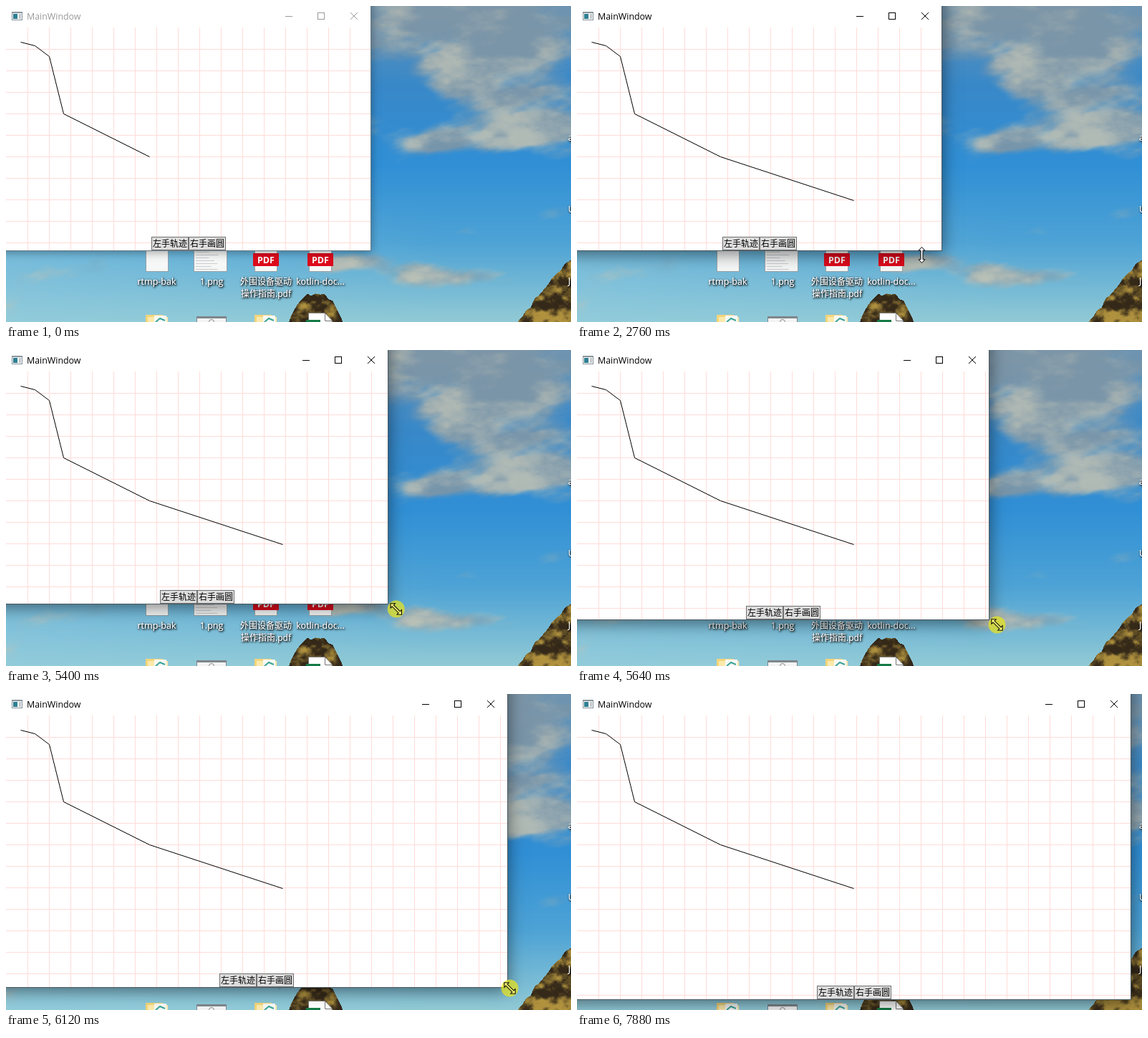
Animation, 789 px wide and 441 px high, one loop 8000 ms. Source, as an HTML page with a canvas:

```html
<!DOCTYPE html>
<html lang="zh">
<head>
<meta charset="utf-8">
<style>
html, body { margin: 0; width: 100%; height: 100%; overflow: hidden; }
canvas { display: block; }
</style>
</head>
<body>
<canvas id="stage" width="789" height="441"></canvas>
<script>
const W = 789, H = 441, LOOP = 8000;
const ctx = document.getElementById('stage').getContext('2d');
const FONT = '"Open Sans", "Noto Sans CJK SC", "Noto Sans CJK", sans-serif';

const lerp = (a, b, k) => a + (b - a) * k;
const mix = (a, b, k) => a.map((v, i) => lerp(v, b[i], k));
const clamp = v => Math.min(1, Math.max(0, v));
const smooth = v => (v = clamp(v)) * v * (3 - 2 * v);

function rect(c, color, x, y, w, h) {
  c.fillStyle = color;
  c.fillRect(x, y, w, h);
}

function trace(c, pts) {
  c.beginPath();
  pts.forEach(([x, y]) => c.lineTo(x, y));
}

function text(c, str, x, y, size, color, align = 'center', weight = '') {
  c.font = `${weight} ${size}px ${FONT}`;
  c.textAlign = align;
  c.fillStyle = color;
  c.fillText(str, x, y);
}

// ---------- scenery: fractal noise for clouds and rock ----------

function hash(x, y) {
  const v = Math.sin(x * 127.1 + y * 311.7) * 43758.5453;
  return v - Math.floor(v);
}

function noise(x, y) {
  const i = Math.floor(x), j = Math.floor(y), u = smooth(x - i), v = smooth(y - j);
  return lerp(lerp(hash(i, j), hash(i + 1, j), u), lerp(hash(i, j + 1), hash(i + 1, j + 1), u), v);
}

function fbm(x, y) {
  let sum = 0;
  for (let k = 0; k < 5; k++) sum += noise(x * 2 ** k + k * 17, y * 2 ** k) / 2 ** (k + 1);
  return sum;
}

const sky = [[98, 146, 183], [56, 136, 200], [48, 143, 213], [78, 163, 213], [146, 202, 213]];
const haze = [146, 205, 224], shade = [128, 150, 165], light = [194, 193, 178];
const umber = [52, 40, 24], ochre = [176, 146, 62];

// centre, radii, strength (negative opens a gap)
const clouds = [
  [640, 40, 230, 80, 1], [725, 130, 110, 45, 0.7], [725, 185, 110, 28, 0.9],
  [588, 190, 45, 15, 0.7], [575, 135, 45, 24, -0.9], [620, 318, 100, 14, 0.4],
  [578, 376, 48, 22, 0.8], [680, 378, 60, 24, 0.75], [470, 356, 80, 18, 0.7]
];

function scenery(x, y) {
  const ridge = 355 + 80 * ((W - x) / 70) ** 1.2;
  const dome = 402 + 39 * Math.abs((x - 433) / 38) ** 2.5;
  if (y > Math.min(ridge, dome) + 6 * noise(x / 6, 3) - 3)
    return mix(umber, ochre, smooth(fbm(x / 13, y / 11) * 2.4 - 0.75));

  const band = Math.min(3.99, y / H * 4), i = Math.floor(band);
  let color = mix(sky[i], sky[i + 1], band - i);
  color = mix(color, haze, 0.5 * clamp((y - 260) / 80) * clamp(1 - x / 600));

  let cover = (fbm((x + y * 0.6) / 85, (y + x * 0.12) / 38) - 0.48) * 1.5;
  for (const [cx, cy, rx, ry, s] of clouds)
    cover += s * Math.exp(-(((x - cx) / rx) ** 2) - ((y - cy) / ry) ** 2);
  const lit = smooth(fbm(x / 60 + 40, y / 30) * 2.2 - 0.9 + x / 2400 + y / 900 - 0.15);
  return mix(color, mix(shade, light, lit), 0.88 * smooth((cover - 0.3) / 0.65));
}

// ---------- desktop, painted once ----------

function label(c, str, x, y, size = 12.5, align) {
  c.save();
  c.shadowColor = '#000';
  c.shadowBlur = 3;
  c.shadowOffsetX = c.shadowOffsetY = 1;
  text(c, str, x, y, size, '#fff', align);
  text(c, str, x, y, size, '#fff', align);
  c.restore();
}

function page(c, x, w) {
  rect(c, '#96a1a6', x, 320, w, 51);
  rect(c, '#f6f7f7', x + 1, 320, w - 2, 50);
}

function pdf(c, x) {
  page(c, x - 16, 32);
  rect(c, '#dd0a1c', x - 18, 345, 36, 18);
  text(c, 'PDF', x, 358.5, 12.5, '#fff', 'center', 'bold');
}

function folder(c, x) {
  rect(c, '#f3d479', x, 431, 24, 10);
  rect(c, '#fbe9ac', x + 3, 434, 28, 7);
  rect(c, '#f8f8f4', x + 12, 432, 17, 9);
  c.strokeStyle = '#3aa59b';
  c.lineWidth = 2;
  trace(c, [[x + 14, 441], [x + 20, 436], [x + 27, 439]]);
  c.stroke();
}

function paintDesktop() {
  const canvas = document.createElement('canvas');
  canvas.width = W;
  canvas.height = H;
  const c = canvas.getContext('2d');
  const img = c.createImageData(W, H);
  for (let y = 0; y < H; y++)
    for (let x = 0; x < W; x++)
      if (x > 500 || y > 335) img.data.set([...scenery(x, y), 255], (y * W + x) * 4);
  c.putImageData(img, 0, 0);

  page(c, 195, 32);
  page(c, 262, 47);
  for (let y = 343; y < 368; y += 4) rect(c, '#c9ccce', 265, y, 12 + hash(y, 1) * 22, 1);
  pdf(c, 363);
  pdf(c, 439);
  label(c, 'rtmp-bak', 210.5, 389);
  label(c, '1.png', 287, 389);
  label(c, '外围设备驱动', 363, 389, 12);
  label(c, '操作指南.pdf', 363, 406, 12);
  label(c, 'kotlin-doc...', 439, 389);
  ['a', 'U', 'J'].forEach((s, i) => label(c, s, 785, 188 + i * 100, 12.5, 'left'));

  folder(c, 195);
  folder(c, 347);
  rect(c, '#7e868b', 266, 433, 42, 8);
  rect(c, '#f4f4f4', 267, 436, 40, 5);
  c.strokeStyle = '#888';
  c.lineWidth = 1;
  c.beginPath();
  c.arc(287, 441, 3.5, 0, 7);
  c.stroke();

  c.fillStyle = '#fff';
  c.strokeStyle = '#777';
  trace(c, [[422.5, 442], [422.5, 428.5], [445.5, 428.5], [455.5, 439], [455.5, 442]]);
  c.fill();
  c.stroke();
  trace(c, [[445.5, 428.5], [445.5, 439.5], [455.5, 439.5]]);
  c.stroke();
  rect(c, '#167a45', 419, 438, 20, 3);
  return canvas;
}

const desktop = paintDesktop();

// ---------- motion ----------

// time, x, y
const pointer = [
  [680, 521, 390], [1240, 280, 316], [1440, 236, 340], [1760, 225, 335],
  [2600, 225, 335], [2760, 481.5, 347.5], [3240, 500, 347.5], [3760, 513, 343],
  [4800, 509.5, 342.5], [5200, 510, 343], [5640, 586.5, 383.5], [5960, 698, 412],
  [6120, 703.5, 410.5], [6640, 773, 429], [7440, 776, 430], [7600, 774, 428]
];

function pointerAt(t) {
  const i = pointer.findIndex(p => p[0] > t);
  if (i < 1) return pointer.at(i).slice(1);
  const a = pointer[i - 1], b = pointer[i];
  return mix(a, b, (t - a[0]) / (b[0] - a[0])).slice(1);
}

// the dragged corner trails the pointer
function cornerAt(t) {
  const [x, y] = pointerAt(Math.max(5200, t - 60));
  return [Math.round(x - 1), Math.round(y - 2)];
}

// ---------- window ----------

const curve = [[20, 50], [40, 55], [60, 70], [80, 150], [200, 210], [386, 271]];

function button(str, x, y, hot, down) {
  rect(ctx, hot ? (down ? '#2c628b' : '#3c7fb1') : '#707070', x, y, 52, 19);
  rect(ctx, hot ? (down ? '#c4e5f6' : '#bee6fd') : '#dddddd', x + 1, y + 1, 50, 17);
  text(ctx, str, x + 26, y + 14, 12, '#000');
}

function drawWindow(w, h, t, mx, my) {
  const active = t >= 2000;
  const ink = active ? '#000' : '#999';
  ctx.save();
  ctx.shadowColor = active ? 'rgba(0,0,0,.5)' : 'rgba(0,0,0,.35)';
  ctx.shadowBlur = active ? 22 : 12;
  ctx.shadowOffsetY = active ? 4 : 2;
  rect(ctx, active ? '#4d5a62' : '#6a7c86', -40, -40, w + 41, h + 41);
  ctx.restore();
  rect(ctx, '#fff', 0, 0, w, h);

  for (let x = 30; x < w; x += 30) rect(ctx, '#ffdcd8', x, 30, 1, h - 30);
  for (let y = 60; y < h; y += 30) rect(ctx, '#ffdcd8', 0, y, w, 1);

  rect(ctx, '#8b959b', 8, 8, 15, 12);
  rect(ctx, '#f2f5f6', 9, 10, 13, 9);
  rect(ctx, '#2f7f93', 10, 11, 6, 7);
  rect(ctx, '#c3cacd', 18, 11, 3, 7);
  text(ctx, 'MainWindow', 29, 19, 12.4, ink, 'left');

  ctx.strokeStyle = ink;
  ctx.lineWidth = 1;
  rect(ctx, ink, w - 119, 14, 10, 1);
  ctx.strokeRect(w - 73.5, 9.5, 9, 9);
  ctx.beginPath();
  for (const s of [-5, 5]) {
    ctx.moveTo(w - 23 - s, 9);
    ctx.lineTo(w - 23 + s, 19);
  }
  ctx.stroke();

  ctx.strokeStyle = '#000';
  trace(ctx, curve.slice(0, t < 2160 ? 5 : 6).map(([x, y]) => [x + 0.5, y + 0.5]));
  ctx.stroke();

  const left = Math.round(w / 2 - 52), top = h - 19;
  const over = x => t >= 680 && t < 2600 && my >= top && my < h && mx >= x && mx < x + 52;
  const down = t >= 2000 && t < 2160;
  button('左手轨迹', left, top, over(left), down);
  button('右手画圆', left + 52, top, over(left + 52), down);
}

// ---------- pointer ----------

const arrow = [[0, 0], [0, 16], [3.7, 12.6], [6.3, 18.3], [8.8, 17.2], [6.3, 11.6], [11.3, 11.6]];
const half = [[0, -11], [4.5, -6.3], [1.5, -6.3], [1.5, 6.3], [4.5, 6.3], [0, 11]];
const resizer = half.concat(half.slice(1, 5).reverse().map(([x, y]) => [-x, y]));

function drawPointer(x, y, t) {
  if (t < 680 || t >= 7880) return;
  const dragging = t >= 5200 && t < 7800;
  if (dragging || (t >= 2000 && t < 2200)) {
    ctx.fillStyle = 'rgba(232,228,30,.72)';
    ctx.beginPath();
    ctx.arc(x, y, 12, 0, 7);
    ctx.fill();
  }
  const sizing = t >= 2720;
  ctx.save();
  ctx.translate(sizing ? x : x + 0.5, sizing ? y : y + 0.5);
  if (t >= 3440) ctx.rotate(-Math.PI / 4);
  trace(ctx, sizing ? resizer : arrow);
  ctx.closePath();
  ctx.fillStyle = dragging ? '#f2ee70' : '#fff';
  ctx.fill();
  ctx.strokeStyle = '#000';
  ctx.lineWidth = 1;
  ctx.stroke();
  ctx.restore();
}

function frame(now) {
  const t = Math.floor(now % LOOP / 40) * 40;
  const [mx, my] = pointerAt(t);
  const [w, h] = cornerAt(t);
  ctx.drawImage(desktop, 0, 0);
  drawWindow(w, h, t, mx, my);
  drawPointer(mx, my, t);
  requestAnimationFrame(frame);
}
requestAnimationFrame(frame);
</script>
</body>
</html>
```
